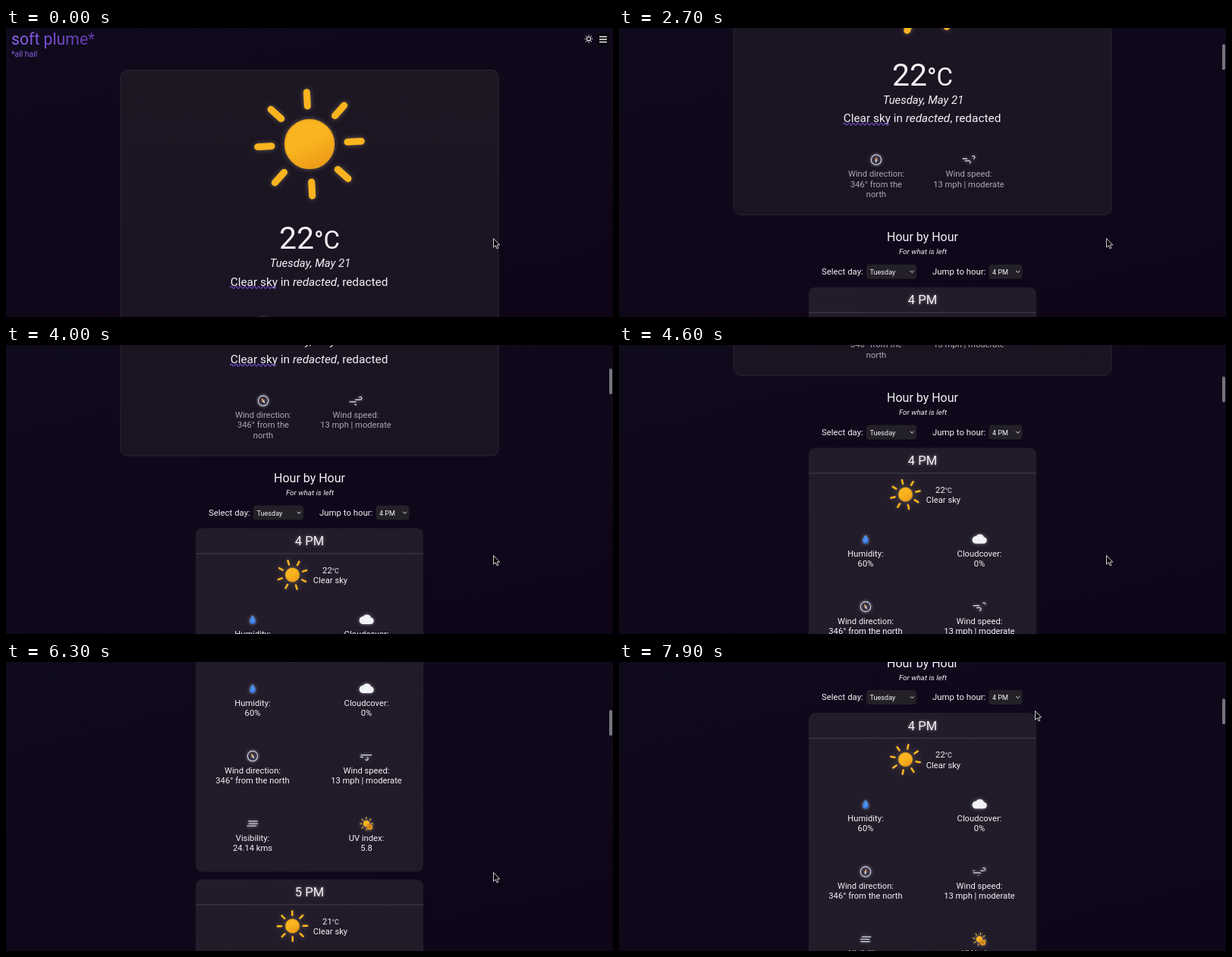
Animation of 800 by 381 pixels, one loop 8 s. Source, as an HTML page:

```html
<!DOCTYPE html>
<html lang="en">
<head>
<meta charset="utf-8">
<title>Weather</title>
<style>
html, body { margin: 0; width: 100%; height: 100%; overflow: hidden; background: #0f0718; }
svg { display: block; }
text { font-family: Roboto, "Open Sans", sans-serif; font-weight: 400; fill: #f3f1f6; }
.mid { text-anchor: middle; }
.it { font-style: italic; }
.med { font-weight: 500; }
.dim text { fill: #aca7b3; }
.glow { filter: drop-shadow(0 0 2px rgba(255,255,255,.5)); }
.sunGlow { filter: drop-shadow(0 0 3px rgba(255,225,170,.35)); }
.line { fill: none; stroke-linecap: round; }
</style>
</head>
<body>
<svg id="stage" width="800" height="381" viewBox="0 0 800 381">
  <defs>
    <linearGradient id="bg" x1="0" y1="0" x2=".5" y2="1">
      <stop stop-color="#0f0a1c"/><stop offset="1" stop-color="#0f0619"/>
    </linearGradient>
    <linearGradient id="card" x1="0" y1="0" x2="0" y2="1">
      <stop stop-color="#1d1724"/><stop offset="1" stop-color="#191322"/>
    </linearGradient>
    <linearGradient id="hour" x1="0" y1="0" x2="1" y2="1">
      <stop stop-color="#221c2a"/><stop offset="1" stop-color="#211a29"/>
    </linearGradient>
    <linearGradient id="title">
      <stop stop-color="#8d63ee"/><stop offset="1" stop-color="#5d36a8"/>
    </linearGradient>
    <linearGradient id="gold" x1=".25" y1="0" x2=".75" y2="1">
      <stop offset=".45" stop-color="#f9b41f"/><stop offset="1" stop-color="#ec9817"/>
    </linearGradient>
    <linearGradient id="drop" x1="0" y1="0" x2="0" y2="1">
      <stop stop-color="#4f9bf5"/><stop offset="1" stop-color="#2f6fd8"/>
    </linearGradient>
  </defs>
  <rect width="800" height="381" fill="url(#bg)"/>
  <g id="page"></g>
  <rect id="thumb" x="795" width="4" height="34" rx="2" fill="#77747c"/>
  <path id="cursor" d="M0 0V11.6L2.7 9.2L4.6 13.4L6.4 12.6L4.6 8.5H8.2Z" fill="#000" stroke="#e8e8e8" stroke-width=".9"/>
</svg>
<script>
const $ = id => document.getElementById(id);
const text = (x, y, size, str, cls = "mid") =>
  `<text x="${x}" y="${y}" font-size="${size}" class="${cls}">${str}</text>`;
const icon = (x, y, size, body, cls = "glow") =>
  `<g class="${cls}"><g transform="translate(${x} ${y}) scale(${size / 64})">${body}</g></g>`;

// Icons are drawn around the origin in a 64 unit box.
const rays = (from, to, width, color) => {
  let d = "";
  for (let i = 0; i < 8; i++) {
    const c = Math.cos(i * Math.PI / 4), s = Math.sin(i * Math.PI / 4);
    d += `M${c * from} ${s * from}L${c * to} ${s * to}`;
  }
  return `<path class="line" d="${d}" stroke="${color}" stroke-width="${width}"/>`;
};
const sun = `<circle r="10.4" fill="url(#gold)" stroke="#e9a01c" stroke-width=".5"/>
  <g class="spin">${rays(16.1, 22, 2.9, "#f9b41f")}</g>`;
const uv = sun + `<rect x="3" y="3" width="17" height="17" rx="5" fill="#f2a01c" stroke="#a8630c"/>
  <path class="line" d="M9 8v4a2.5 2.5 0 0 0 5 0v-4" stroke="#7a4306" stroke-width="2"/>`;
const drop = `<path d="M0 -15C5 -8 10 -2 10 5A10 10 0 0 1 -10 5C-10 -2 -5 -8 0 -15Z" fill="url(#drop)"/>
  <path class="line" d="M-3 8L3 0" stroke="#a9d0ff" stroke-width="2"/>`;
const cloud = `<path d="M14 13A9 9 0 0 0 14 -5A13 13 0 0 0 -10 -8A10 10 0 0 0 -13 13Z" fill="#f2f3f6"
  stroke="#f2f3f6" stroke-width="4"/>`;
const compass = `<circle r="17" fill="#3b3548" stroke="#ccd0dc" stroke-width="3"/>
  <g class="needle"><path d="M0 -11L4 0H-4Z" fill="#e9a24b"/><path d="M0 11L4 0H-4Z" fill="#d9dce6"/></g>`;
const wind = `<g class="line" transform="translate(-32 -32)" stroke="#dcdfe7" stroke-width="3">
  <path class="gust" stroke-dasharray="35 22" d="M43.6 20a5 5 0 1 1 3.6 8.5h-35.5"/>
  <path class="breeze" stroke-dasharray="24 15" d="M29.1 44a5 5 0 1 0 3.6-8.5h-21"/></g>`;
const mist = [-8, 0, 8].map(y =>
  `<path class="line mist" d="M-15 ${y}h30" stroke="#d3d7e0" stroke-width="3"/>`).join("");

const fact = (x, y, pic, ...lines) =>
  icon(x, y, 25, pic) + lines.map((s, i) => text(x, y + 22.5 + i * 13.3, 11.2, s)).join("");

const select = (x, width, label) => `
  <rect x="${x}" y="527" width="${width}" height="19" rx="4" fill="#232027"/>
  ${text(x + 4.5, 540, 9.1, label, "")}
  <path class="line" d="M${x + width - 8} 535.5l2.2 2.2l2.2 -2.2" stroke="#eee"/>`;

const hourCard = (y, hour, degrees) => `<g transform="translate(0 ${y})">
  <rect x="250" width="300" height="362" rx="9" fill="url(#hour)"/>
  <path d="M250 33.5h300" stroke="#453e4b"/>
  <g class="glow">${text(400, 22.5, 16.6, hour)}</g>
  ${icon(377.5, 61.5, 57, sun, "sunGlow")}
  ${text(428, 59, 11.2, `${degrees}<tspan font-size="9">°C</tspan>`)}
  ${text(427.5, 72.5, 11.2, "Clear sky")}
  ${fact(325, 120.5, drop, "Humidity:", "60%")}
  ${fact(475, 120.5, cloud, "Cloudcover:", "0%")}
  ${fact(325, 209.5, compass, "Wind direction:", "346° from the north")}
  ${fact(475, 209.5, wind, "Wind speed:", "13 mph | moderate")}
  ${fact(325, 298.5, mist, "Visibility:", "24.14 kms")}
  ${fact(475, 298.5, uv, "UV index:", "5.8")}
</g>`;

$("page").innerHTML = `
  <text x="7" y="22" font-size="21.2" style="fill:url(#title)">soft plume*</text>
  <text x="7" y="38" font-size="10.4" style="fill:#8a5fe6">*all hail</text>
  <g transform="translate(768 14.3)" fill="none">
    <circle r="2.6" stroke="#eee" stroke-width="1.1"/>${rays(4.4, 4.9, 1.1, "#eee")}
  </g>
  <rect x="779.5" y="7.5" width="14.5" height="15" fill="#050308"/>
  <path d="M782 11.5h10M782 15h10M782 18.5h10" stroke="#f4f4f4" stroke-width="1.3"/>
  <rect x="151" y="55.5" width="498" height="406" rx="9" fill="url(#card)" stroke="#2a2433"/>
  ${icon(400, 153, 199, sun, "sunGlow")}
  ${text(400, 291, 41, '22<tspan font-size="33" class="med">°</tspan><tspan font-size="33">C</tspan>')}
  ${text(401, 315, 14.9, "Tuesday, May 21", "mid it")}
  ${text(399.5, 339.5, 15.4, 'Clear sky in <tspan class="it">redacted</tspan>, redacted')}
  <path class="line" d="M295.5 342q1.5 -3 3 0${"t3 0".repeat(19)}" stroke="#7b4fd6" stroke-width="1.2"/>
  <g class="dim">
    ${fact(339, 389, compass, "Wind direction:", "346° from the", "north")}
    ${fact(461, 389, wind, "Wind speed:", "13 mph | moderate")}
  </g>
  ${text(400, 496.5, 16, "Hour by Hour")}
  ${text(400.5, 513.5, 9.9, "For what is left", "mid it")}
  ${text(267, 540, 11.4, "Select day:", "")}${select(326, 66, "Tuesday")}
  ${text(413, 540, 11.4, "Jump to hour:", "")}${select(487.5, 44, "4 PM")}
  ${hourCard(557, "4 PM", 22)}
  ${hourCard(929, "5 PM", 21)}`;

const scrollKeys = [[2000, 0], [2900, 246], [3700, 246], [4400, 421.5], [4700, 421.5],
  [5400, 647], [6250, 647], [6850, 423.5], [7000, 423.5], [7450, 490]];
const smooth = u => { u = Math.min(1, Math.max(0, u)); return u * u * (3 - 2 * u); };
const scrollAt = t => scrollKeys.reduce((y, [at, to], i) => {
  if (!i) return 0;
  const [from, start] = scrollKeys[i - 1];
  return t < from ? y : start + (to - start) * smooth((t - from) / (at - from));
}, 0);
const each = (cls, attr, value) =>
  document.querySelectorAll("." + cls).forEach(el => el.setAttribute(attr, value));

function draw(t) {
  const y = scrollAt(t), s = t / 1000, move = smooth((t - 7350) / 500);
  $("page").setAttribute("transform", `translate(0 ${-y})`);
  $("thumb").setAttribute("y", y * .0983);
  $("thumb").setAttribute("visibility", y > 0 ? "visible" : "hidden");
  $("cursor").setAttribute("transform", `translate(${642.5 - 94 * move} ${277.5 - 213 * move})`);
  each("spin", "transform", `rotate(${-3.1 + 7.5 * s})`);
  each("needle", "transform", `rotate(${-14 + 25 * Math.sin(s * 2.6)})`);
  each("gust", "stroke-dashoffset", 57 - 57 * s);
  each("breeze", "stroke-dashoffset", 39 - 39 * (s + .5));
  document.querySelectorAll(".mist").forEach((el, i) =>
    el.setAttribute("transform", `translate(${3 * Math.sin(s * 1.05 + (i % 3) * 2)} 0)`));
}

const start = performance.now();
function tick() {
  draw((performance.now() - start) % 8000);
  requestAnimationFrame(tick);
}
tick();
</script>
</body>
</html>
```
